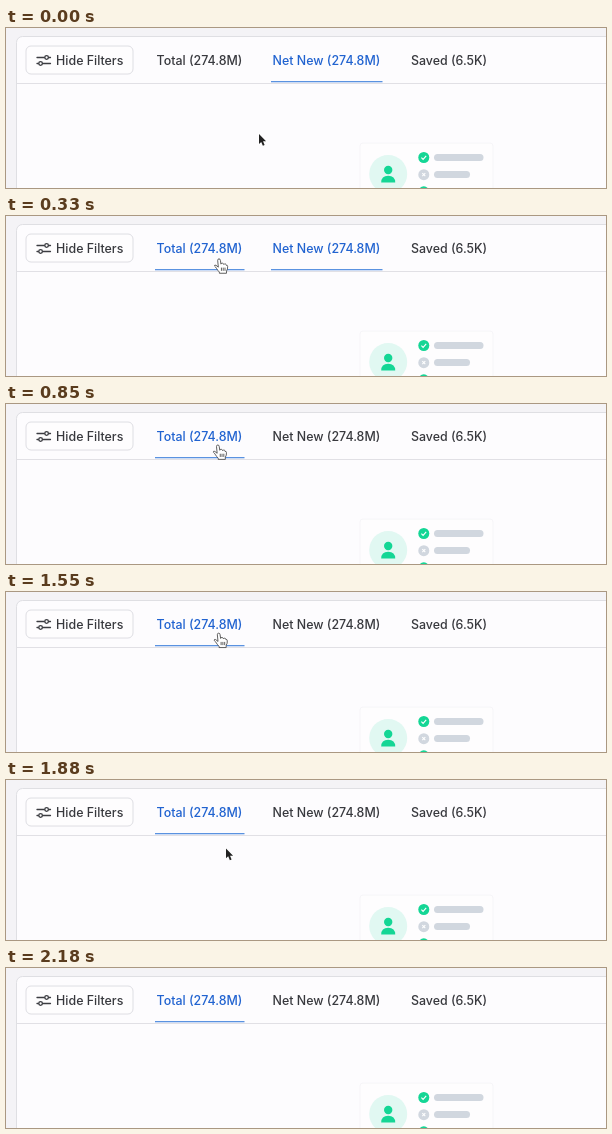
Animation, 600 px wide and 160 px high, one loop 3030 ms. Source, as an HTML page:

```html
<!DOCTYPE html>
<html lang="en">
<head>
<meta charset="utf-8">
<title>Filter tabs</title>
<style>
  html, body { margin: 0; width: 100%; height: 100%; overflow: hidden; background: #f4f3f6; }
  svg { display: block; width: 600px; height: 160px; }
  text { font: 500 12.42px Inter, Roboto, sans-serif; fill: #38393e; }
</style>
</head>
<body>
<svg viewBox="0 0 600 160">
  <path d="M10.5 165V14.5a6 6 0 0 1 6-6H605V165Z" fill="#fdfcfe" stroke="#dfdfe3"/>
  <path d="M11 55.5H600" stroke="#e1e0e5"/>

  <rect x="20" y="18" width="107" height="28" rx="5" fill="#fefdfe" stroke="#dedee3"/>
  <g fill="#fefdfe" stroke="#3c3d42" stroke-width="1.3" stroke-linecap="round">
    <path d="M31 29.5H44.5M31 35.5H44.5"/>
    <circle cx="40.6" cy="29.5" r="1.8"/>
    <circle cx="34.6" cy="35.5" r="1.8"/>
  </g>
  <text x="50.1" y="36.5">Hide Filters</text>

  <text id="total" x="150.6" y="36.5">Total (274.8M)</text>
  <text id="fresh" x="266.6" y="36.5">Net New (274.8M)</text>
  <text x="404.9" y="36.5">Saved (6.5K)</text>
  <g fill="#5a92e0">
    <rect id="totalLine" x="149" y="53" width="89.5" height="1.3"/>
    <rect id="freshLine" x="265" y="53" width="111.5" height="1.3"/>
  </g>

  <rect x="354" y="115" width="133" height="60" rx="3" fill="#fefdfe" stroke="#f6f5f8"/>
  <circle cx="382.2" cy="146" r="19" fill="#e1f8f2"/>
  <g fill="#14d695">
    <circle cx="382.2" cy="142" r="4.2"/>
    <path d="M375.2 154.5q0-6.8 7-6.8t7 6.8Z"/>
    <circle cx="417.8" cy="129.5" r="5.5"/>
    <circle cx="417.8" cy="163.8" r="5.5"/>
  </g>
  <g fill="#d1d7df">
    <circle cx="417.8" cy="146.7" r="5.5"/>
    <rect x="428" y="126" width="49.5" height="7" rx="3.5"/>
    <rect x="428" y="143" width="36" height="7" rx="3.5"/>
  </g>
  <path d="M415.4 129.7l1.7 1.7 3.1-3.5M416.3 145.2l3 3m0-3l-3 3" fill="none" stroke="#fff" stroke-width="1.1"/>

  <g id="arrow">
    <path transform="scale(.92)" d="M0 0V10.8L2.4 8.6 4.2 12.8 6.1 12 4.4 7.9H7.7Z" fill="#222" stroke="#fff" stroke-width="1.6" paint-order="stroke"/>
  </g>
  <g id="hand">
    <g transform="scale(.94)" stroke="#444" stroke-width=".9" stroke-linejoin="round">
      <path fill="#fff" d="M-1.6 1.6Q-1.6 0-.2 0T1.3 1.6L1.9 5.6Q2.2 4.3 3.5 4.6T5 6Q5.6 4.9 6.6 5.4T7.6 6.9Q8.8 6.3 9 8 9.2 11 7.8 13V15.3H.2V14Q-1.4 12.5-2.6 10.5T-5 7.6Q-5 6.2-3.4 6.8L-.9 8.8Z"/>
      <path d="M2.4 9.3v3.4M4.3 9.3v3.4M6.2 9.3v3.4"/>
    </g>
  </g>
</svg>
<script>
const LOOP = 3030;
const INK = [56, 57, 62], BLUE = [33, 99, 208];
const REST = [253, 106], TAB = [212, 41], BELOW = [220.5, 98.5], EXIT = [148, 180];
const $ = id => document.getElementById(id);

const ramp = (t, a, b) => Math.min(1, Math.max(0, (t - a) / (b - a)));
const easeIn = p => u => u ** p;
const easeOut = p => u => 1 - (1 - u) ** p;

function move(t, start, end, from, to, easeX, easeY = easeX) {
  const u = ramp(t, start, end);
  return [easeX, easeY].map((ease, i) => from[i] + (to[i] - from[i]) * ease(u));
}

function cursorAt(t) {
  if (t < 1530) return move(t, 30, 420, REST, TAB, easeOut(2.4));
  if (t < 2060) return move(t, 1530, 2060, TAB, BELOW, easeOut(2.6), easeIn(1.8));
  return move(t, 2060, 2180, BELOW, EXIT, easeIn(1.5));
}

function setTab(id, k) {
  $(id).style.fill = `rgb(${INK.map((c, i) => c + (BLUE[i] - c) * k)})`;
  $(id + 'Line').style.opacity = k;
}

function draw(t) {
  setTab('total', ramp(t, 250, 310));
  setTab('fresh', 1 - ramp(t, 800, 845));
  const [x, y] = cursorAt(t);
  const cursor = y < 55.5 ? 'hand' : 'arrow';
  for (const id of ['arrow', 'hand']) {
    $(id).setAttribute('transform', `translate(${x} ${y})`);
    $(id).style.display = id === cursor ? '' : 'none';
  }
}

const start = performance.now();
function tick() {
  draw((performance.now() - start) % LOOP);
  requestAnimationFrame(tick);
}
tick();
</script>
</body>
</html>
```
